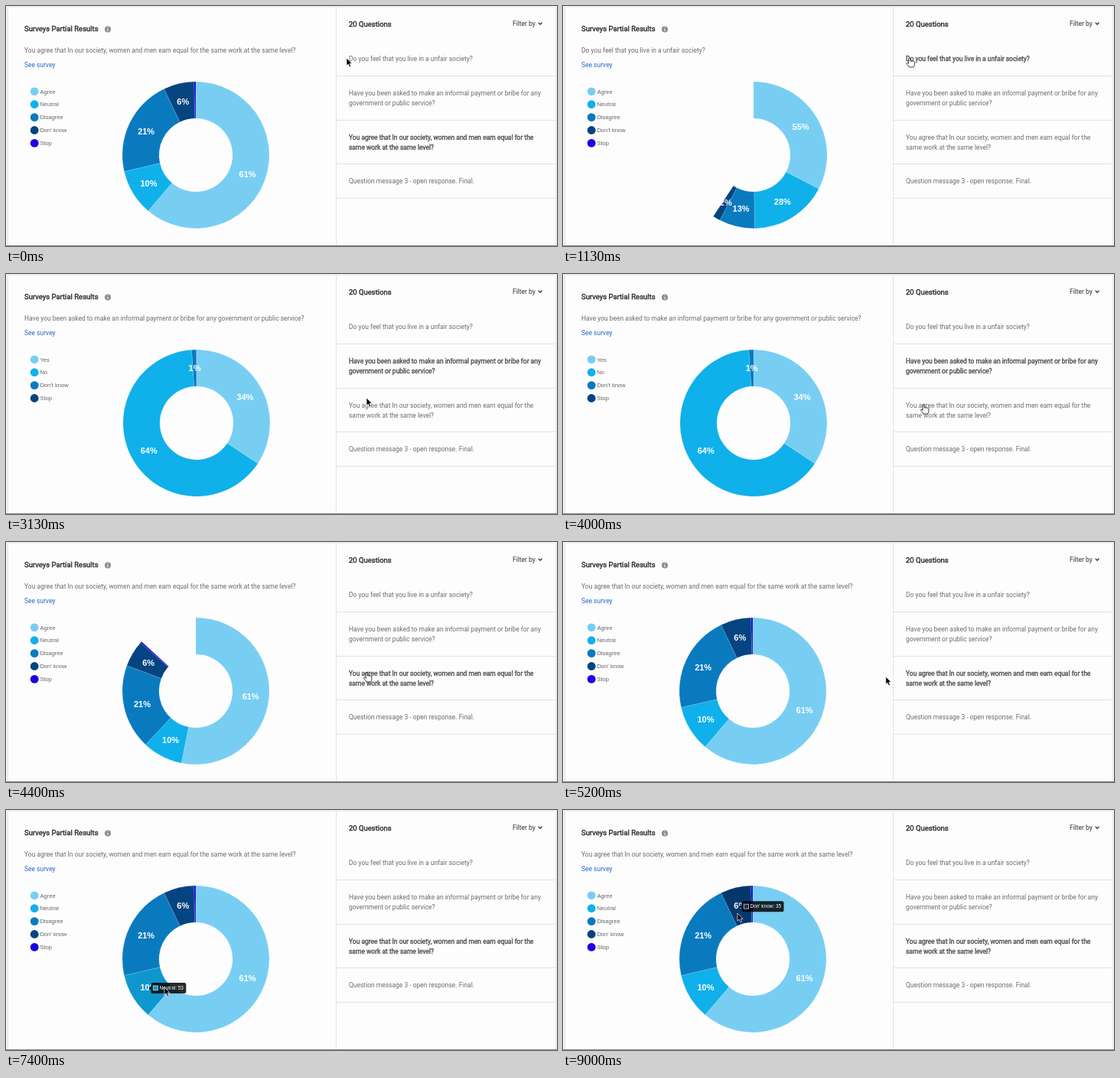
Write an HTML page that moves like this. It is 720 px wide and 314 px high and loops after 9.07 s.

```html
<!DOCTYPE html>
<html lang="en">
<head>
<meta charset="utf-8">
<title>Survey results</title>
<style>
  html, body { margin: 0; width: 100%; height: 100%; overflow: hidden; background: #f1f3f7; }
  svg { display: block; width: 720px; height: 314px; }
  text { font: 8.47px Roboto, sans-serif; fill: #6c6c70; white-space: pre; }
  .title { font-size: 9.5px; fill: #26262a; stroke: #26262a; stroke-width: .35px; }
  .on text { fill: #48484c; stroke: #48484c; stroke-width: .32px; }
  .link { fill: #2468c4; }
  .filter { fill: #333; }
  .rule { stroke: #e2e3e9; fill: none; }
  .legend text { font: 7.6px "Liberation Sans", Arial, sans-serif; fill: #666; }
  .pct text { font: bold 11px "Liberation Sans", Arial, sans-serif; fill: #fff; text-anchor: middle; }
  .slices path { stroke: #fff; stroke-opacity: .35; stroke-width: .4; }
  #tip text { font: 6.45px "Liberation Sans", Arial, sans-serif; fill: #fff; }
</style>
</head>
<body>
<svg viewBox="0 0 720 314">
  <rect width="720" height="314" fill="#f1f3f7"/>
  <rect x="2.5" y="1" width="716" height="314" fill="#fdfdfe" stroke="#e4e6ec"/>
  <path class="rule" d="M431.5 1V313M432 91.5H718M432 149.5H718M432 206.5H718M432 251.5H718"/>
  <rect y="313" width="720" height="1" fill="#8b8d90"/>

  <text class="title" x="24" y="33.4">Surveys Partial Results</text>
  <circle cx="133" cy="30.5" r="4" fill="#8c8c91"/>
  <path d="M133 28v1.1M133 30v3" stroke="#fff" stroke-width="1.1"/>
  <text id="question" x="24" y="61.4"></text>
  <text class="link" x="24" y="80">See survey</text>

  <text class="title" x="448" y="27.4">20 Questions</text>
  <text class="filter" x="662" y="26">Filter by</text>
  <path d="M695.7 21.6l2.4 2.5 2.4-2.5" fill="none" stroke="#222" stroke-width="1.3"/>
  <g id="list"></g>

  <g id="legends"></g>
  <g id="slices" class="slices"></g>
  <g id="pct" class="pct"></g>
  <g id="tip">
    <path id="bubble" fill="#000" fill-opacity=".83"/>
    <rect id="swatch" width="6" height="6" y="-3" stroke="#fff" stroke-width=".6"/>
    <text id="tipText" y="2.3"></text>
  </g>

  <g id="cursor">
    <circle id="ring" r="21.5" fill="none" stroke="#111" stroke-width="1.3"/>
    <path id="arrow" d="M0 0V10L2.3 8 3.9 11.8 5.7 11 4.1 7.3H7.1Z" fill="#000" stroke="#fff" stroke-width=".7"/>
    <path id="hand" d="M-1.4 7.5V1a1.1 1.1 0 0 1 2.2 0V4.2a1 1 0 0 1 1.9.2 1 1 0 0 1 1.9.3 1 1 0 0 1 1.8.6V8.5Q6.2 10 5.2 12H-.6Q-1.6 10-4 7.6A1.1 1.1 0 0 1-2.4 6.3Z" fill="#fff" stroke="#111" stroke-width=".8"/>
  </g>
</svg>
<script>
const LOOP = 9070, CY = 195, R = 96, HOLE = 48, MID = (R + HOLE) / 2;
const $ = id => document.getElementById(id);

function add(parent, tag, attrs, text = '') {
  const el = document.createElementNS('http://www.w3.org/2000/svg', tag);
  for (const k in attrs) el.setAttribute(k, attrs[k]);
  el.textContent = text;
  parent.append(el);
  return el;
}
const set = (el, attrs) => { for (const k in attrs) el.setAttribute(k, attrs[k]); };
const show = (el, on) => { el.style.display = on ? '' : 'none'; };
const lerp = (a, b, p) => a + (b - a) * p;
const clamp = p => Math.min(1, Math.max(0, p));
const outQuart = p => 1 - (1 - clamp(p)) ** 4;
const inOut = p => p * p * (3 - 2 * p);

const base = [[120, 206, 242], [16, 176, 234], [10, 122, 191], [4, 68, 128], [26, 0, 226]];
const hot = [[80, 199, 254], [14, 151, 205], [5, 104, 168], [4, 56, 108], [20, 0, 190]];
const rgb = c => `rgb(${c.map(Math.round)})`;

const charts = [
  { cx: 249, values: [55.06, 28.9, 13.2, 2.84, 0], names: ['Agree', 'Neutral', 'Disagree', "Don't know", 'Stop'],
    lines: ['Do you feel that you live in a unfair society?'], y: 72 },
  { cx: 249, values: [34.3, 64.67, 1.03, 0], names: ['Yes', 'No', "Don't know", 'Stop'],
    lines: ['Have you been asked to make an informal payment or bribe for any', 'government or public service?'], y: 117 },
  { cx: 248, values: [319, 53, 112, 35, 2], names: ['Agree', 'Neutral', 'Disagree', "Don' know", 'Stop'],
    lines: ['You agree that In our society, women and men earn equal for the', 'same work at the same level?'], y: 175 },
];
const rows = [...charts, { lines: ['Question message 3 - open response. Final.'], y: 232 }].map(q => {
  const g = add($('list'), 'g', {});
  q.lines.forEach((s, i) => add(g, 'text', { x: 448, y: q.y + i * 12.7 }, s));
  return g;
});
const legends = charts.map(c => {
  const g = add($('legends'), 'g', { class: 'legend' });
  c.names.forEach((s, i) => {
    const y = 111.8 + i * 16.9;
    add(g, 'circle', { cx: 37.2, cy: y, r: 5.4, fill: rgb(base[i]) });
    add(g, 'text', { x: 44.4, y: y + 2.7 }, s);
  });
  return g;
});
const slices = base.map(() => add($('slices'), 'path', {}));
const labels = base.map(() => add($('pct'), 'text', {}));

// [start, chart]
const views = [[-2000, 2], [930, 0], [2270, 1], [4004, 2]];
// [start, hovered slice]
const hovers = [[-2000, -1], [5650, 0], [6620, -1], [6960, 1], [8000, 2], [8740, 3]];
const clicks = [[730, 930], [2070, 2270], [3800, 4000]];
const hands = [[250, 1400], [1800, 2700], [3200, 4950]];
// [time, x, y]
const path = [
  [0, 445, 68], [70, 445, 68], [400, 453, 68], [1250, 453, 68], [1930, 462, 114], [2600, 462, 114],
  [3130, 471, 162], [3450, 471.5, 171], [4830, 471.5, 171], [5730, 337, 185], [6200, 338, 188],
  [6330, 338, 188], [7050, 208, 231], [7400, 207, 232], [7730, 207, 232], [8400, 186, 172],
  [8670, 186, 172], [9000, 228, 135], [LOOP, 228, 135],
];
const within = (spans, t) => spans.some(([a, b]) => t >= a && t < b);
const lastIndex = (list, t) => list.findLastIndex(e => e[0] <= t);

const polar = (cx, r, a) => [cx + r * Math.sin(a), CY - r * Math.cos(a)];
function ringSlice(cx, a, b) {
  const big = +(b - a > Math.PI);
  return `M${polar(cx, R, a)}A${R} ${R} 0 ${big} 1 ${polar(cx, R, b)}` +
    `L${polar(cx, HOLE, b)}A${HOLE} ${HOLE} 0 ${big} 0 ${polar(cx, HOLE, a)}Z`;
}

function heat(i, t) {
  const k = lastIndex(hovers, t), p = outQuart((t - hovers[k][0]) / 400);
  const was = k && hovers[k - 1][1] === i ? 1 : 0;
  return lerp(was, hovers[k][1] === i ? 1 : 0, p);
}

function drawChart(t) {
  const [start, index] = views[lastIndex(views, t)], c = charts[index];
  const total = c.values.reduce((a, b) => a + b), p = outQuart((t - start) / 1000);
  $('question').textContent = c.lines.join(' ');
  rows.forEach((g, i) => g.setAttribute('class', i === index ? 'on' : ''));
  legends.forEach((g, i) => show(g, i === index));
  let angle = 0;
  slices.forEach((el, i) => {
    const part = (c.values[i] || 0) / total, end = angle + part * p * 2 * Math.PI;
    show(el, part > 0);
    show(labels[i], part >= .01);
    const h = heat(i, t);
    set(el, { d: ringSlice(c.cx, angle, end), fill: rgb(base[i].map((v, j) => lerp(v, hot[i][j], h))) });
    const [x, y] = polar(c.cx, MID, (angle + end) / 2);
    set(labels[i], { x, y: y + 3.9 });
    labels[i].textContent = Math.floor(part * 100) + '%';
    angle = end;
  });
}

function anchor(i) {
  const { cx, values } = charts[2], sum = n => values.slice(0, n).reduce((a, b) => a + b, 0);
  return polar(cx, MID, (sum(i) + values[i] / 2) / sum(5) * 2 * Math.PI);
}

function drawTip(t) {
  const k = lastIndex(hovers, t), seen = hovers.slice(0, k + 1).map(h => h[1]).filter(i => i >= 0);
  show($('tip'), seen.length);
  if (!seen.length) return;
  const [start, now] = hovers[k], p = outQuart((t - start) / 400);
  const i = seen.at(-1), from = anchor(now < 0 ? i : seen.at(-2) ?? i), to = anchor(i);
  const wasOn = hovers[k - 1][1] >= 0;
  $('tipText').textContent = `${charts[2].names[i]}: ${charts[2].values[i]}`;
  const w = $('tipText').getComputedTextLength() + 14.4, left = i === 0 ? -w - 3 : 3;
  const side = i === 0 ? -3 : 3;
  set($('bubble'), { d: `M0 0L${side} -2.8V2.8ZM${left + 2.5} -7H${left + w - 2.5}q2.5 0 2.5 2.5V4.5q0 2.5 -2.5 2.5H${left + 2.5}q-2.5 0 -2.5 -2.5V-4.5q0 -2.5 2.5 -2.5Z` });
  set($('swatch'), { x: left + 3.2, fill: rgb(hot[i]) });
  set($('tipText'), { x: left + 11 });
  set($('tip'), {
    transform: `translate(${lerp(from[0], to[0], p)} ${lerp(from[1], to[1], p) + .6})`,
    opacity: lerp(+wasOn, +(now >= 0), p),
  });
}

function drawCursor(t) {
  const k = Math.min(lastIndex(path, t), path.length - 2);
  const [t0, x0, y0] = path[k], [t1, x1, y1] = path[k + 1], p = inOut(clamp((t - t0) / (t1 - t0)));
  const hand = within(hands, t);
  set($('cursor'), { transform: `translate(${lerp(x0, x1, p)} ${lerp(y0, y1, p)})` });
  show($('hand'), hand);
  show($('arrow'), !hand);
  show($('ring'), within(clicks, t));
}

const origin = performance.now();
function frame() {
  const t = Math.max(0, performance.now() - origin) % LOOP;
  drawChart(t);
  drawTip(t);
  drawCursor(t);
  requestAnimationFrame(frame);
}
frame();
</script>
</body>
</html>
```
